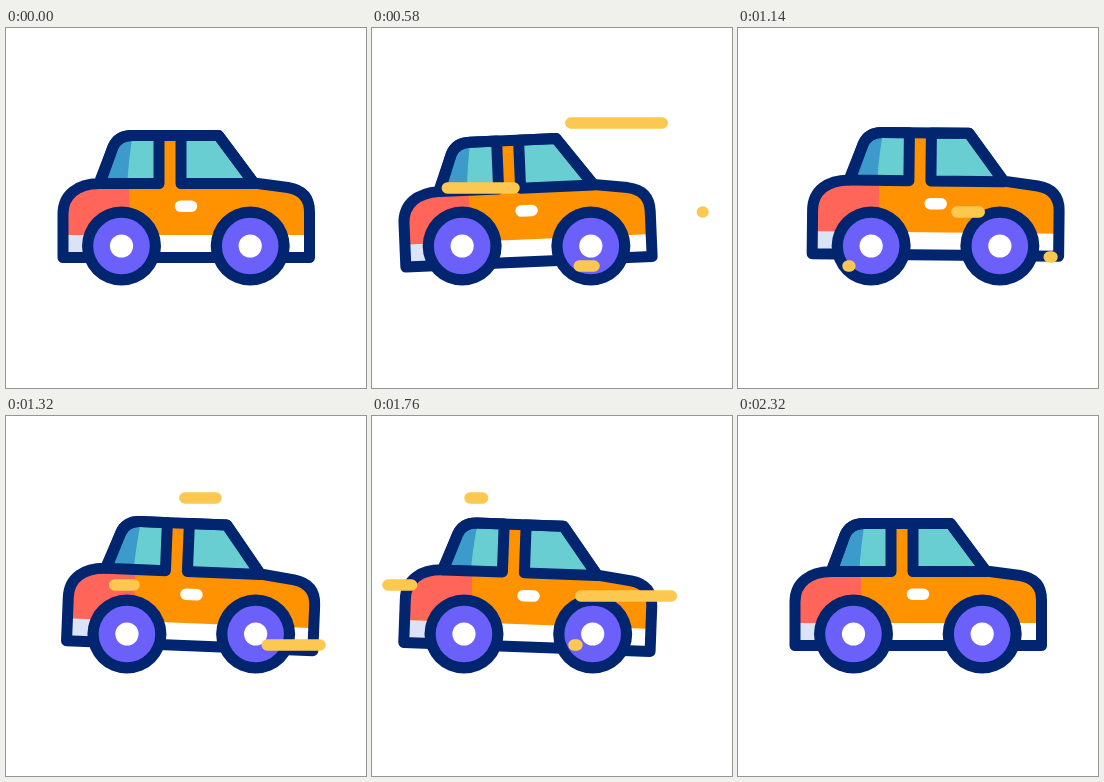
These frames come from a looping animation (360 by 360 pixels, 2420 ms). An HTML page with a canvas:

```html
<!DOCTYPE html>
<html lang="en">
<head>
<meta charset="utf-8">
<title>Car</title>
<style>
html, body { margin: 0; width: 100%; height: 100%; overflow: hidden; background: #fff; }
canvas { display: block; width: 360px; height: 360px; }
</style>
</head>
<body>
<canvas id="stage"></canvas>
<script>
const LOOP = 2420;
const NAVY = '#02256f', ORANGE = '#ff9200', RED = '#ff6559', TEAL = '#69ced2',
  BLUE = '#3c9bcb', VIOLET = '#6b60fa', LAVENDER = '#dce3f6', YELLOW = '#fdc850';

const canvas = document.getElementById('stage');
const ctx = canvas.getContext('2d');
const ratio = window.devicePixelRatio || 1;
canvas.width = canvas.height = 360 * ratio;

// Keys are [time, value] pairs, eased with a sine between them.
const shiftKeys = [[40, 0], [560, -25.5], [1120, 17.8], [1680, -25.5], [2130, 0]];
const tiltKeys = [[260, 0], [680, -2.8], [1520, 3.1], [2150, 0]];
const bounceKeys = [[0, 0], [300, 1], [2080, 1], [2300, 0]];

// Wind streaks: right end, height, start time.
const streaks = [
  [297, 95, 220], [142, 160, 317], [222, 238, 458], [331, 184, 556],
  [314, 229, 1088], [210, 82, 1142], [128, 169, 1180], [314, 180, 1364]
];
const STREAK_LENGTH = 112;

const clamp = x => Math.min(1, Math.max(0, x));
const quad = x => x < 0.5 ? 2 * x * x : 1 - 2 * (1 - x) ** 2;
const sine = x => (1 - Math.cos(Math.PI * x)) / 2;

function valueAt(keys, t) {
  let value = keys[0][1];
  for (let i = 1; i < keys.length; i++) {
    const [t0, v0] = keys[i - 1], [t1, v1] = keys[i];
    if (t >= t0) value = v0 + (v1 - v0) * sine(clamp((t - t0) / (t1 - t0)));
  }
  return value;
}

function fill(path, color) {
  ctx.fillStyle = color;
  ctx.fill(path);
}

function stroke(path, color, width = 11) {
  ctx.strokeStyle = color;
  ctx.lineWidth = width;
  ctx.stroke(path);
}

function disc(x, y, r, color) {
  ctx.fillStyle = color;
  ctx.beginPath();
  ctx.arc(x, y, r, 0, Math.PI * 2);
  ctx.fill();
}

function clipped(path, draw) {
  ctx.save();
  ctx.clip(path);
  draw();
  ctx.restore();
}

const shell = new Path2D('M57 229.5V186C57 166 72 156 93 155.5L107 119Q112 107.5 126 107.5H212.5L248 155L282 159.5Q303.5 163 303.5 184V229.5Z');
const rearWindow = new Path2D('M94 155.5L107 119Q112 107.5 126 107.5H153V155.5Z');
const frontWindow = new Path2D('M175 107.5H212.5L248 155.5H175Z');
const rearTint = new Path2D('M80 100H128Q123 125 121 160H80Z');
const rearPanel = new Path2D('M50 150H122Q125 178 121 207H50Z');
const handle = new Path2D('M174.5 178.3H185.5');

function drawBody() {
  fill(shell, ORANGE);
  clipped(shell, () => {
    fill(rearPanel, RED);
    ctx.fillStyle = '#fff';
    ctx.fillRect(100, 207, 210, 24);
    ctx.fillStyle = LAVENDER;
    ctx.fillRect(50, 207, 50, 24);
  });
  fill(rearWindow, TEAL);
  clipped(rearWindow, () => fill(rearTint, BLUE));
  fill(frontWindow, TEAL);
  for (const path of [rearWindow, frontWindow, shell]) stroke(path, NAVY);
  stroke(handle, '#fff', 11.5);
}

function drawWheel(x) {
  disc(x, 218, 39.5, NAVY);
  disc(x, 218, 28.3, VIOLET);
  disc(x, 218, 11.6, '#fff');
}

function drawStreak([right, y, start], t) {
  const age = t - start;
  const head = quad(clamp(age / 480));
  const tail = quad(clamp((age - 285) / 438));
  if (age <= 0 || tail >= 1) return;
  const line = new Path2D();
  line.moveTo(right - tail * STREAK_LENGTH, y);
  line.lineTo(right - head * STREAK_LENGTH - 0.01, y);
  stroke(line, YELLOW, 11.5);
}

function render(t) {
  ctx.setTransform(ratio, 0, 0, ratio, 0, 0);
  ctx.fillStyle = '#fff';
  ctx.fillRect(0, 0, 360, 360);
  ctx.lineCap = ctx.lineJoin = 'round';

  const shift = valueAt(shiftKeys, t);
  const bounce = valueAt(bounceKeys, t) * (4.6 * Math.cos((t - 580) / 420 * Math.PI * 2) - 0.2);

  ctx.save();
  ctx.translate(180 + shift, 180 + bounce);
  ctx.rotate(valueAt(tiltKeys, t) * Math.PI / 180);
  ctx.translate(-180, -180);
  drawBody();
  ctx.restore();

  drawWheel(115.5 + shift);
  drawWheel(244.2 + shift);
  for (const streak of streaks) drawStreak(streak, t);
}

const origin = performance.now();
function tick() {
  render((performance.now() - origin) % LOOP);
  requestAnimationFrame(tick);
}
tick();
</script>
</body>
</html>
```
